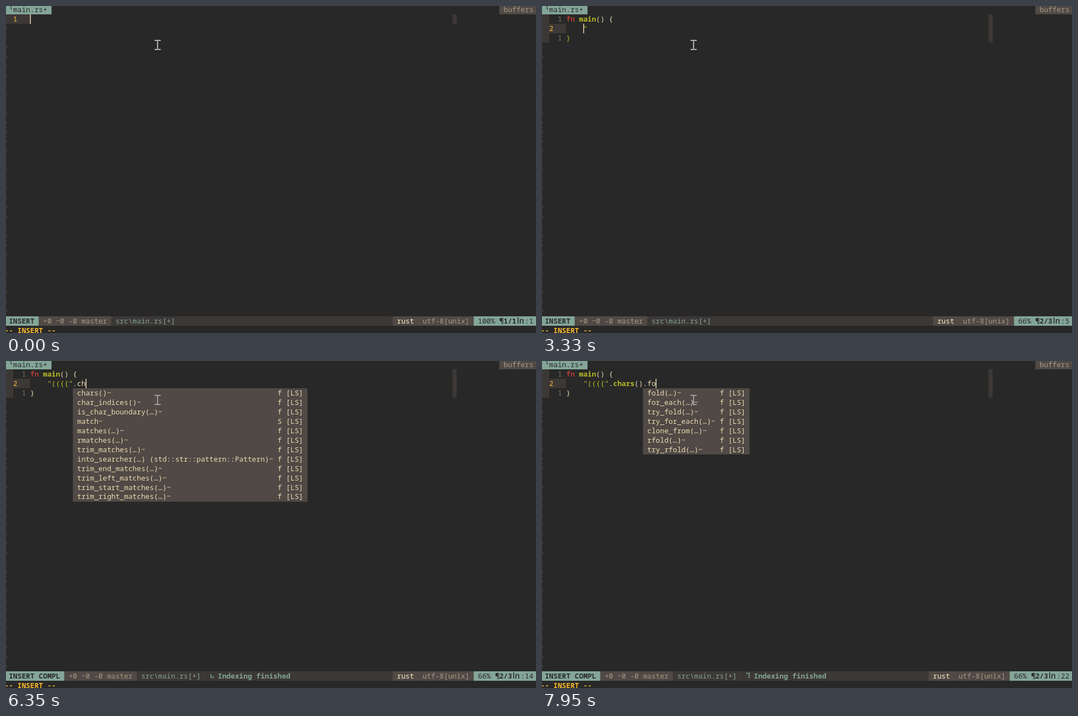
Write an HTML page with a canvas that moves like this. It is 952 px wide and 588 px high and loops after 8000 ms.

```html
<!DOCTYPE html>
<html lang="en">
<head>
<meta charset="utf-8">
<title>Editor session</title>
<style>
html, body { margin: 0; width: 100%; height: 100%; overflow: hidden; background: #282828; }
canvas { display: block; }
</style>
</head>
<body>
<canvas id="stage" width="952" height="588"></canvas>
<script>
const ctx = document.getElementById('stage').getContext('2d');
const LOOP = 8000;
const CELL_W = 7.66, CELL_H = 16.97, LEFT = -2.46, TOP = -2;
const COLS = 124, STATUS_ROW = 33, GUTTER = 6;
const FONT = '12.77px "Noto Sans Mono", "DejaVu Sans Mono", monospace';
const LN_FONT = '600 14px "Open Sans", sans-serif';

const C = {
  bg: '#282828', bg1: '#3c3836', bg2: '#504945', gray: '#7c6f64', soft: '#a89984',
  fg: '#ebdbb2', light: '#fbf1c7', red: '#fb4934', green: '#b8bb26', yellow: '#fabd2f', blue: '#83a598'
};

const SIGNATURE = 'fn main() {';
const KEYS = [
  [3330, '"'], [3600, '('], [3800, '('], [4310, '{'], [4520, '{'], [4700, '"'],
  [5530, '.'], [6220, 'c'], [6290, 'h'], [6480, 'a'], [6600, 'r'], [6750, 's'],
  [7020, '('], [7090, ')'], [7280, '.'], [7820, 'f'], [7950, 'o']
];
const SPINNER = '⠋⠙⠹⠸⠼⠴⠦⠧⠇⠏';
const PROGRESS = [
  [1740, 2440], [1840, 2340], [3480, 4080], [4540, 4940], [5000, 5300],
  [5590, 5890], [6250, 6880], [7020, 7090], [7380, 7680], [7850, LOOP]
];

// A trailing "+" means the method takes arguments.
const STR_ITEMS = ('chars char_indices is_char_boundary+ match matches+ rmatches+ trim_matches+ into_searcher+ ' +
  'trim_end_matches+ trim_left_matches+ trim_start_matches+ trim_right_matches+ as_bytes as_ptr bytes ' +
  'contains+ ends_with+ escape_debug find+ get+ is_empty len lines parse repeat+ replace+ rfind+ split+ ' +
  'starts_with+ to_lowercase').split(' ');
const ITER_ITEMS = ('fold+ for_each+ try_fold+ try_for_each+ clone_from+ rfold+ try_rfold+ all+ any+ as_str by_ref ' +
  'chain+ cloned cmp+ collect count cycle enumerate filter+ filter_map+ find+ flat_map+ flatten fuse last ' +
  'map+ max min next nth+').split(' ');
const MENUS = [
  { from: 5720, to: 7020, col: 16, keysFrom: 6220, items: STR_ITEMS },
  { from: 7480, to: LOOP, col: 24, keysFrom: 7820, items: ITER_ITEMS }
];

const x = col => LEFT + col * CELL_W;
const y = row => TOP + row * CELL_H;

function fill(row, col, cols, color, rows = 1) {
  const top = Math.round(y(row));
  ctx.fillStyle = color;
  ctx.fillRect(x(col), top, cols * CELL_W, Math.round(y(row + rows)) - top);
}

function put(row, col, text, color, bold) {
  ctx.font = (bold ? 'bold ' : '') + FONT;
  ctx.fillStyle = color;
  for (const ch of text) {
    if (ch !== ' ') ctx.fillText(ch, x(col), y(row) + 12.9);
    col++;
  }
  return col;
}

// The line-count sign is one glyph, two cells wide.
function putLn(row, col, color) {
  ctx.font = LN_FONT;
  ctx.fillStyle = color;
  ctx.fillText('ln', x(col) + 1, y(row) + 12.9);
  return col + 2;
}

// Text on a coloured block; returns the column after it.
function block(row, col, text, color, back, bold) {
  fill(row, col, text.length, back);
  return put(row, col, text, color, bold);
}

function typed(t, from = 0) {
  return KEYS.filter(k => k[0] >= from && k[0] <= t).map(k => k[1]).join('');
}

function putCode(row, text) {
  const token = /(fn(?= ))|("[^"]*"?)|((?<=fn )\w+|(?<=\.)\w+(?=\())|(.)/g;
  let col = GUTTER;
  for (const m of text.matchAll(token)) {
    const color = m[1] ? C.red : m[2] || m[3] ? C.green : C.fg;
    col = put(row, col, m[0], color, !!m[3]);
  }
}

function buffer(t) {
  const head = SIGNATURE.slice(0, t < 490 ? 0 : Math.floor((t - 490) / 72) + 1);
  if (t < 1310) return { lines: [head], row: 1, caret: head.length };
  if (t < 1370) return { lines: [head, ''], row: 2, caret: 4 };
  if (t < 1430) return { lines: [head, '}'], row: 2, caret: 1 };
  if (t < 1490) return { lines: [head, '}'], row: 2, caret: 0, normal: true };
  const lag = t < 5000 ? 40 : 0;
  return {
    lines: [head, '    ' + typed(t), '}'],
    row: 2,
    caret: 4 + typed(t - lag).length
  };
}

function drawTabs() {
  block(0, 0, ' ¹main.rs+ ', C.bg, C.blue);
  fill(0, 116, 9, C.bg2);
  put(0, 117, 'buffers', C.soft);
}

function drawBuffer(buf) {
  const openString = buf.lines.length > 2 && buf.lines[1].split('"').length === 2;
  for (let row = 1; row < STATUS_ROW; row++) {
    const line = buf.lines[row - 1];
    if (line === undefined) {
      put(row, 0, '~', C.bg2);
      continue;
    }
    const here = row === buf.row;
    fill(row, 0, here ? GUTTER : 2, C.bg1);
    fill(row, 105, 1, C.bg1);
    put(row, here ? 2 : 4, String(here ? row : Math.abs(row - buf.row)), here ? C.yellow : C.gray);
    if (row === 3 && openString) put(row, GUTTER, line, C.green);
    else putCode(row, line);
  }
  const col = GUTTER + buf.caret;
  if (buf.normal) {
    block(buf.row, col, '}', C.bg, C.fg);
  } else {
    ctx.fillStyle = C.fg;
    ctx.fillRect(Math.floor(x(col)), Math.round(y(buf.row)), 1.5, 17);
  }
}

function label(item) {
  const name = item.replace('+', '');
  if (name === 'match') return 'match~';
  const args = item.endsWith('+') ? '(…)' : '()';
  const origin = name === 'into_searcher' ? ' (std::str::pattern::Pattern)' : '';
  return name + args + origin + '~';
}

function drawMenu(menu, t) {
  const word = typed(t, menu.keysFrom);
  const pattern = new RegExp(word.split('').join('.*'));
  const found = menu.items.filter(item => pattern.test(item));
  if (!word) found.sort();
  const labels = found.map(label);
  const width = Math.max(...labels.map(s => s.length));
  fill(3, menu.col, width + 9, C.bg2, labels.length);
  labels.forEach((text, i) => {
    const kind = text === 'match~' ? 'S' : 'f';
    put(3 + i, menu.col + 1, text.padEnd(width + 1) + kind + ' [LS]', C.fg);
  });
}

function drawStatus(t, buf, menu) {
  const row = STATUS_ROW;
  const accent = buf.normal ? C.soft : C.blue;
  const mode = buf.normal ? ' NORMAL ' : menu ? ' INSERT COMPL ' : ' INSERT ';
  fill(row, 0, COLS + 1, C.bg1);
  let col = block(row, 0, mode, C.bg, accent, true);
  col = block(row, col, ' +0 ~0 -0 master ', C.soft, C.bg2);
  col = put(row, col + 1, 'src\\main.rs[+]', accent) + 2;
  for (const [from, to] of PROGRESS) {
    if (t < from || t >= to) continue;
    const tick = from + Math.floor((t - from) / 100) * 100;
    const frame = SPINNER[Math.floor((tick + 330) / 100) % 10];
    col = put(row, col, frame + ' Indexing finished ', accent, true);
  }

  const total = buf.lines.length;
  const percent = ` ${Math.floor(100 * buf.row / total)}% `;
  const place = `¶${buf.row}/${total}`;
  const column = ':' + (buf.caret + 1);
  const start = COLS - percent.length - place.length - 2 - column.length;
  fill(row, start - 19, 19, C.bg2);
  put(row, start - 18, 'rust', C.light);
  put(row, start - 12, 'utf-8[unix]', C.soft);
  fill(row, start, COLS + 1 - start, accent);
  col = put(row, start, percent, C.bg);
  col = put(row, col, place, C.bg, true);
  col = putLn(row, col, C.bg);
  put(row, col, column, C.bg);
  if (!buf.normal) put(row + 1, 0, '-- INSERT --', C.yellow, true);
}

// The mouse pointer inverts whatever lies beneath it.
function drawPointer() {
  ctx.globalCompositeOperation = 'difference';
  ctx.fillStyle = '#fff';
  ctx.fillRect(267, 61, 11, 1.6);
  ctx.fillRect(271.5, 62.6, 1.6, 14.8);
  ctx.fillRect(267, 77.4, 11, 1.6);
  ctx.globalCompositeOperation = 'source-over';
}

function draw(now) {
  const t = now % LOOP;
  const buf = buffer(t);
  const menu = MENUS.find(m => t >= m.from && t < m.to);
  ctx.fillStyle = C.bg;
  ctx.fillRect(0, 0, 952, 588);
  drawTabs();
  drawBuffer(buf);
  drawStatus(t, buf, menu);
  if (menu) drawMenu(menu, t);
  drawPointer();
}

function loop() {
  draw(performance.now());
  requestAnimationFrame(loop);
}
loop();
</script>
</body>
</html>
```
